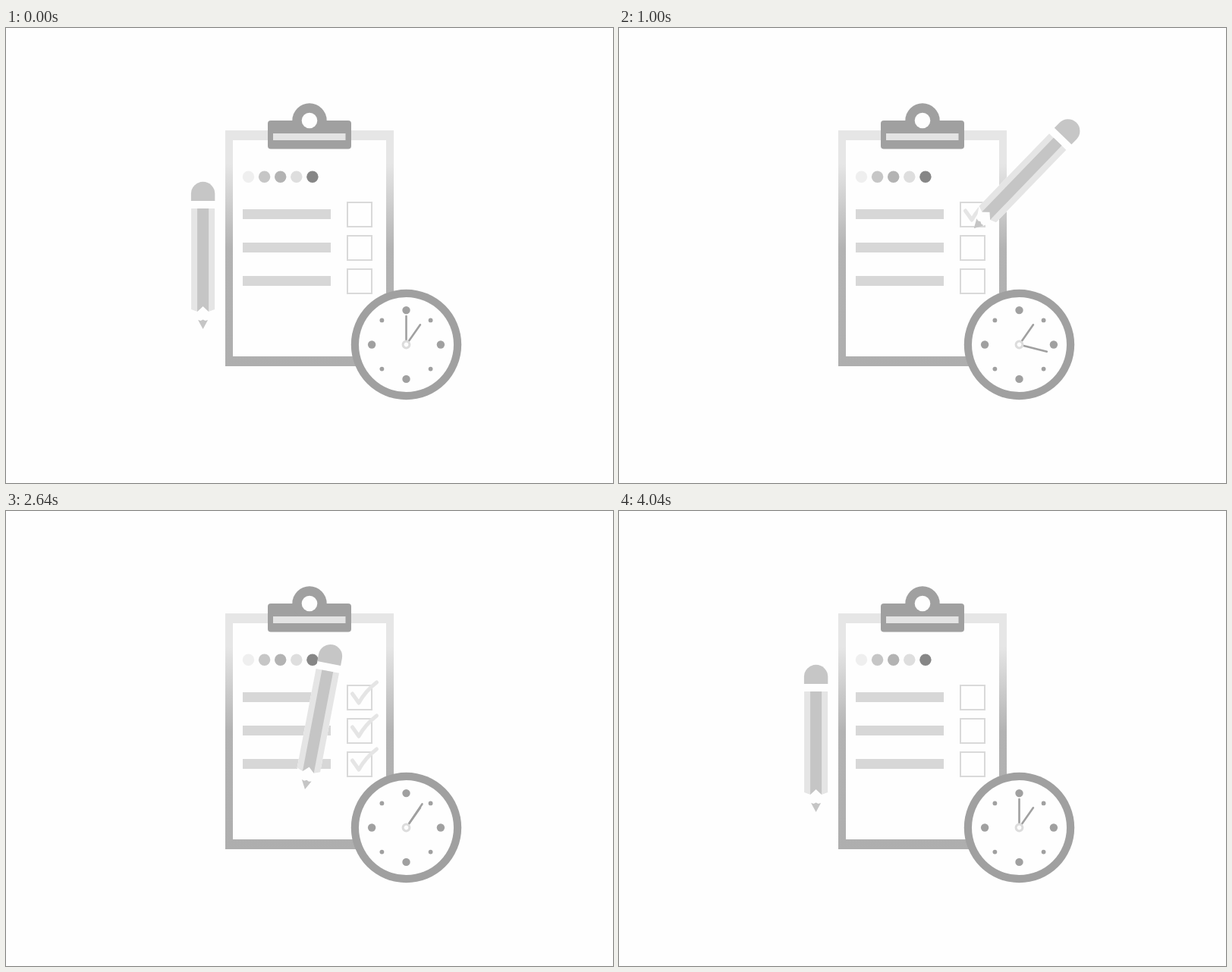
Animation of 800x600 px, one loop 5 s. Source, as an HTML page:

```html
<!DOCTYPE html>
<html lang="en">
<head>
<meta charset="utf-8">
<title>Checklist</title>
<style>
html, body { margin: 0; width: 100%; height: 100%; overflow: hidden; background: #fefefe; }
svg { display: block; width: 800px; height: 600px; }
.paper { fill: #fefefe; }
.dark { fill: #a0a0a0; }
.box { fill: none; stroke: #d9d9d9; stroke-width: 2; }
.check { fill: none; stroke: #e5e5e5; stroke-width: 5; stroke-linecap: round; stroke-linejoin: round; }
.hand { stroke: #a0a0a0; stroke-width: 2.6; stroke-linecap: round; }
</style>
</head>
<body>
<svg viewBox="0 0 800 600">
  <defs>
    <linearGradient id="frame" gradientUnits="userSpaceOnUse" x1="0" y1="135" x2="0" y2="446">
      <stop offset=".14" stop-color="#e6e6e6"/>
      <stop offset=".5" stop-color="#b3b3b3"/>
      <stop offset="1" stop-color="#aeaeae"/>
    </linearGradient>
  </defs>
  <rect x="289" y="135" width="222" height="311" fill="url(#frame)"/>
  <rect class="paper" x="299" y="148" width="202" height="285"/>
  <g id="sheet"><rect class="paper" x="299" y="148" width="202" height="285"/></g>

  <rect class="dark" x="345" y="122" width="110" height="37.5" rx="4"/>
  <circle class="dark" cx="400" cy="122" r="22.7"/>
  <circle class="paper" cx="400" cy="122" r="10.3"/>
  <rect x="352" y="139" width="95.500" height="9" fill="#e3e3e3"/>

  <g id="clock" transform="translate(527.5 417.5)">
    <circle class="dark" r="72.700"/>
    <circle class="paper" r="62.500"/>
    <path class="hand" d="M0 -5V-32" transform="rotate(35.2)"/>
    <path class="hand" id="minute" d="M0 -5V-37.500"/>
    <circle class="paper" r="4.400" stroke="#dcdcdc" stroke-width="3"/>
  </g>

  <!-- the tip of the pencil is its origin -->
  <g id="pencil">
    <path class="paper" d="M-15.500 -170H15.500V-26L6.500 -12H-6.500L-15.500 -26Z"/>
    <path fill="#c6c6c6" d="M-15.700 -169V-178.500A15.700 15.700 0 0 1 15.700 -178.500V-169Z"/>
    <path fill="#e5e5e5" d="M-15.500 -159H15.500V-26L7.500 -23L0 -30L-7.500 -23L-15.500 -26Z"/>
    <path fill="#c5c5c5" d="M-7.500 -159H7.500V-23L0 -30L-7.500 -23Z"/>
    <path fill="#c5c5c5" d="M-6.500 -12L-3 -11L0 -12.500L3 -11L6.500 -12L0 0Z"/>
  </g>
</svg>
<script>
const $ = id => document.getElementById(id);

function add(parent, tag, attrs) {
  const el = document.createElementNS('http://www.w3.org/2000/svg', tag);
  for (const k in attrs) el.setAttribute(k, attrs[k]);
  return parent.appendChild(el);
}

const sheet = $('sheet'), clock = $('clock');
['#efefef', '#c6c6c6', '#b3b3b3', '#dedede', '#868686'].forEach((fill, i) =>
  add(sheet, 'circle', { cx: 319.5 + 21.1 * i, cy: 196.3, r: 7.7, fill }));

const checks = [0, 44, 88].map(y => {
  add(sheet, 'rect', { x: 312, y: 239 + y, width: 116, height: 13, fill: '#d7d7d7' });
  add(sheet, 'rect', { x: 450, y: 230 + y, width: 32, height: 32, class: 'box' });
  return add(sheet, 'path', {
    d: `M456.500 ${241 + y}L465 ${253 + y}Q474 ${237 + y} 488.500 ${226 + y}`, class: 'check'
  });
});

for (let i = 0; i < 8; i++) {
  const a = i * Math.PI / 4;
  clock.insertBefore(
    add(clock, 'circle', { cx: 45.4 * Math.sin(a), cy: -45.4 * Math.cos(a), r: i % 2 ? 2.9 : 5.2, class: 'dark' }),
    $('minute'));
}

const clamp = x => Math.min(1, Math.max(0, x));
const easeIn = p => p ** 3;
const easeOut = p => 1 - (1 - p) ** 3;
const easeInOut = p => p < .5 ? 4 * p ** 3 : 1 - 4 * (1 - p) ** 3;

// Times are in ticks of 40 ms.
const TICK = 40, LOOP = 5000, DRAW = 6;
const starts = [14, 29, 47];
const lengths = checks.map(c => c.getTotalLength());

const rest = [259.6, 397, 0], swing = [394, 367, 10.8];
const onCheck = (i, p) => {
  const { x, y } = checks[i].getPointAtLength(p * lengths[i]);
  return [x, y, 44];
};
// from, to, start pose, end pose, easing
const moves = [
  [0, 14, rest, onCheck(0, 0), easeInOut],
  [20, 29, onCheck(0, 1), onCheck(1, 0), easeInOut],
  [35, 45, onCheck(1, 1), onCheck(2, 0), easeInOut],
  [60, 66, onCheck(2, 1), swing, easeIn],
  [66, 72, swing, rest, easeOut]
];

function pencilPose(t) {
  const drawing = starts.findIndex(s => t >= s && t < s + DRAW);
  if (drawing >= 0) return onCheck(drawing, (t - starts[drawing]) / DRAW);
  const [from, to, a, b, ease] = moves.filter(m => t >= m[0]).pop();
  const p = ease(clamp((t - from) / (to - from)));
  return a.map((v, i) => v + (b[i] - v) * p);
}

// Minute hand: tick and angle, joined by a smooth curve
const turns = [[0, 0], [8, 13], [16, 34.5], [28, 134], [35, 231.6], [42, 315], [48, 358], [50, 364],
  [58, 376], [66, 394], [78, 493], [84, 578], [92, 676], [98, 718], [100, 725]];

function minuteAngle(t) {
  if (t > 100) return 0;
  const n = turns.length - 1;
  const slope = i => {
    const a = turns[Math.max(0, i - 1)], b = turns[Math.min(n, i + 1)];
    return (b[1] - a[1]) / (b[0] - a[0]);
  };
  let i = 0;
  while (i < n - 1 && t >= turns[i + 1][0]) i++;
  const [t0, a] = turns[i], [t1, b] = turns[i + 1];
  const w = t1 - t0, p = (t - t0) / w, q = 1 - p;
  return a * q * q * (1 + 2 * p) + b * p * p * (1 + 2 * q)
    + w * p * q * (slope(i) * q - slope(i + 1) * p);
}

function draw(now) {
  const t = Math.floor(now % LOOP / TICK);
  const [x, y, angle] = pencilPose(t);
  $('pencil').setAttribute('transform', `translate(${x} ${y}) rotate(${angle})`);
  $('minute').setAttribute('transform', `rotate(${minuteAngle(t)})`);
  sheet.setAttribute('transform', `translate(0 ${39.3 * Math.sin(Math.PI * clamp((t - 71) / 13))})`);
  checks.forEach((c, i) => {
    const p = t < 80 ? clamp((t - starts[i]) / DRAW) : 0;
    c.style.visibility = p ? 'visible' : 'hidden';
    c.style.strokeDasharray = `${p * lengths[i] + (p === 1 ? 1 : 0)} 200`;
  });
}

const begin = performance.now();
function loop() {
  draw(performance.now() - begin);
  requestAnimationFrame(loop);
}
loop();
</script>
</body>
</html>
```
